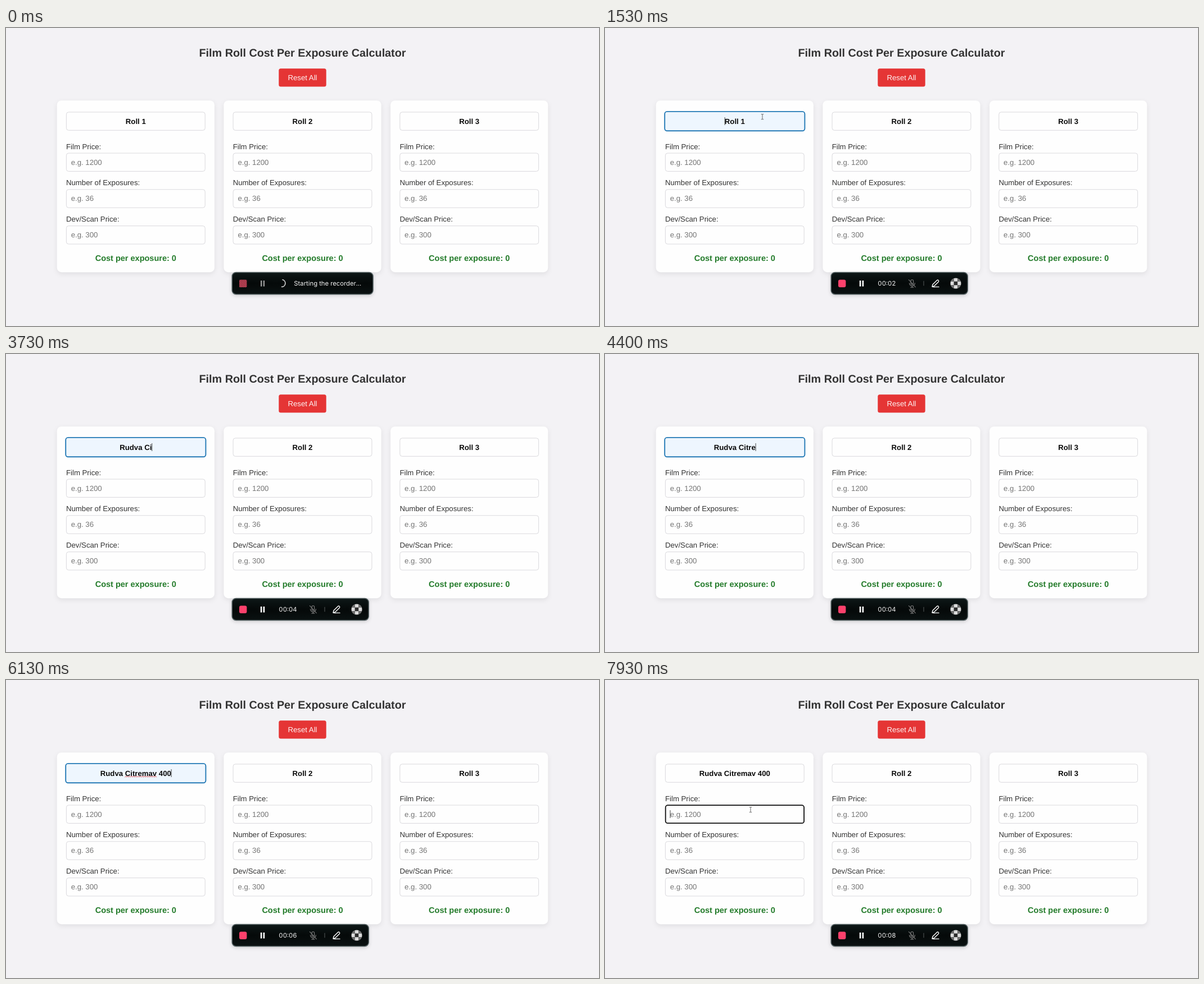
These frames come from a looping animation (1055x531 px, 8 s). An HTML page:

```html
<!DOCTYPE html>
<html lang="en">
<head>
<meta charset="utf-8">
<title>Film Roll Cost Per Exposure Calculator</title>
<style>
html, body { margin: 0; width: 100%; height: 100%; overflow: hidden; background: #f3f2f5; }
svg { display: block; width: 100vw; height: 100vh; }
text { font: 13.19px "Liberation Sans", Arial, sans-serif; fill: #333; white-space: pre; text-rendering: geometricPrecision; }
.mid { text-anchor: middle; }
.title { font-size: 19.78px; font-weight: bold; }
.name { font-weight: bold; fill: #0a0a0a; }
.hint { fill: #757575; }
.cost { font-size: 14.5px; font-weight: bold; fill: #237b2a; }
.card { fill: #fefefe; filter: drop-shadow(0 3px 4px rgba(0, 0, 0, .08)); }
.field { fill: #fefefe; stroke: #d6d5da; stroke-width: .9; }
.bar { fill: url(#ink); stroke: #536062; stroke-width: 1.5; filter: drop-shadow(0 2px 3px rgba(0, 0, 0, .15)); }
.bar-text { font: 11.3px Inter, Roboto, sans-serif; font-variant-numeric: tabular-nums; fill: #f4f4f4; }
.line { fill: none; stroke-linecap: round; stroke-linejoin: round; }
</style>
</head>
<body>
<svg viewBox="0 0 1055 531">
  <defs>
    <linearGradient id="ink" x2="0" y2="1"><stop stop-color="#0d1717"/><stop offset=".5" stop-color="#050909"/><stop offset="1" stop-color="#0a1111"/></linearGradient>
    <pattern id="hatch" width="3" height="3" patternUnits="userSpaceOnUse"><rect width="3" height="3" fill="#8d2f3e"/><path d="M0 0L3 3" stroke="#e2566c"/></pattern>
    <clipPath id="round"><circle cx="624" cy="455" r="9.8"/></clipPath>
  </defs>
  <text class="mid title" x="527.5" y="51">Film Roll Cost Per Exposure Calculator</text>
  <rect x="485.3" y="72.3" width="84.4" height="32.2" rx="3.5" fill="#e53535"/>
  <text class="mid" x="527.5" y="93" style="fill:#fdf4f4">Reset All</text>
  <g id="cards"></g>

  <rect id="nameFocus" x="106.2" y="148.9" width="249.2" height="34.4" rx="4.3" fill="#eef6fe" stroke="#2379b5" stroke-width="1.9"/>
  <rect id="priceFocus" class="line" x="107.7" y="223.2" width="246.4" height="32" rx="4" stroke="#111" stroke-width="1.8"/>
  <text id="name" class="mid name" x="230.8" y="170.6"></text>
  <path id="squiggle" class="line" stroke="#e0393c" stroke-width=".9"/>
  <path id="caret" d="M0 0v14" stroke="#333" stroke-width=".9"/>
  <path id="beam" class="line" d="M-1.8-4.6h1.2l.6.6.6-.6h1.2M0-4v8M-1.8 4.6h1.2l.6-.6.6.6h1.2" stroke="#555" stroke-width=".9"/>
  <path id="hand" class="line" d="M-3.8-.6C-5-1.8-3.6-3-2.6-2.2-3-4.4-1-4.8-.6-3.6-.2-5 1.6-4.8 1.7-3.5 2.6-4.4 4-3.4 3.9-2.2 5-2.2 5 0 4.5 1.4L3.2 4.6H-1.6C-2.4 2.8-4.4 1.6-3.8-.6ZM-.6-3.4v1.4M1.6-3.3v1.4M3.7-2.2v1.2" style="fill:#fff" stroke="#333" stroke-width="1"/>

  <g id="starting">
    <rect class="bar" x="402.2" y="435.4" width="250.8" height="39" rx="7"/>
    <rect x="415" y="448.5" width="13.4" height="13.4" rx="1.5" fill="url(#hatch)"/>
    <path d="M454.2 450v10.4M458.9 450v10.4" stroke="#999" stroke-width="2.4"/>
    <path id="spinner" class="line" d="M0-6.5A6.5 6.5 0 0 1-1.5 6.3" stroke="#ddd" stroke-width="1.6"/>
    <text class="bar-text" x="512.3" y="459.2">Starting the recorder...</text>
  </g>
  <g id="recording">
    <rect class="bar" x="402.2" y="435.4" width="243" height="39" rx="7"/>
    <rect x="415" y="448.5" width="13.4" height="13.4" rx="3" fill="#fd416c"/>
    <path d="M454.1 450v10.4M458.9 450v10.4" stroke="#fff" stroke-width="2.6"/>
    <text id="clock" class="mid bar-text" x="501.5" y="459.2"></text>
    <g class="line" stroke="#777" stroke-width="1.2">
      <rect x="544" y="448.5" width="4.6" height="8.4" rx="2.3"/>
      <path d="M541.5 454.5a4.9 4.9 0 0 0 9.8 0M546.4 459.5v2.6M543.8 462.1h5.2M540.4 448.6l12 13"/>
    </g>
    <path d="M567 450.8v8.4" stroke="#4a5050" stroke-width="1.2"/>
    <path class="line" d="M582 461l1-4 7.6-7.6q1.6-1 2.6.2t.1 2.6l-7.4 7.4-3.9 1.4q2.4.6 5 .4h7" stroke="#fff" stroke-width="1.4"/>
    <g id="checker" clip-path="url(#round)"></g>
  </g>
</svg>
<script>
const LOOP = 8000, CENTER = 230.8;
const el = id => document.getElementById(id);
const nameText = el('name'), caret = el('caret'), squiggle = el('squiggle');

const field = (x, y) => `<rect class="field" x="${x}" y="${y}" width="246.8" height="32.4" rx="4"/>`;
const rows = [['Film Price:', 1200], ['Number of Exposures:', 36], ['Dev/Scan Price:', 300]];
el('cards').innerHTML = [1, 2, 3].map(n => {
  const left = 90.7 + (n - 1) * 296.7, x = left + 16.7, mid = left + 140.1;
  return `<rect class="card" x="${left}" y="129.2" width="280.2" height="306" rx="8"/>` + field(x, 149.9) +
    (n > 1 ? `<text class="mid name" x="${mid}" y="170.6">Roll ${n}</text>` : '') +
    rows.map(([label, value], i) => {
      const y = 223 + i * 64.8;
      return `<text x="${x - .4}" y="${y - 7.4}">${label}</text>${field(x, y)}
        <text class="hint" x="${x + 8.3}" y="${y + 20.6}">e.g. ${value}</text>`;
    }).join('') +
    `<text class="mid cost" x="${mid}" y="415">Cost per exposure: 0</text>`;
}).join('');

const tones = ['#707070', '#dcdcdc', '#2b2b2b'];
for (let i = 0; i < 9; i++) {
  const col = i % 3, row = (i - col) / 3, tone = i === 4 ? 2 : i % 2;
  el('checker').innerHTML += `<rect x="${614.4 + col * 6.4}" y="${445.4 + row * 6.4}" width="6.4" height="6.4" fill="${tones[tone]}"/>`;
}

const TYPED = 'Rudva Citremav 400';
const keyTimes = [2130, 2400, 2740, 2900, 3080, 3300, 3560, 3700, 3950, 4080, 4220, 4420, 4560, 4720, 4980, 5400, 5650, 5800];
const RECORD = 140, FOCUS = 300, MOVE = 6960, CLICK = 7680;

// Pointer waypoints: time, x, y
const pointerPath = [[300, 280, 158], [1500, 280, 158], [1800, 280, 163], [6960, 280, 163],
  [7180, 282, 199], [7300, 282, 199], [7560, 259, 231], [8000, 259, 231]];
function pointerAt(t) {
  const i = Math.max(1, pointerPath.findIndex(p => p[0] > t));
  const [a, b] = [pointerPath[i - 1], pointerPath[i]];
  const k = Math.min(1, Math.max(0, (t - a[0]) / (b[0] - a[0])));
  const s = k * k * (3 - 2 * k);
  return [a[1] + (b[1] - a[1]) * s, a[2] + (b[2] - a[2]) * s];
}

const show = (node, on) => node.style.display = on ? '' : 'none';
const place = (node, x, y) => node.setAttribute('transform', `translate(${x} ${y})`);

function draw(t) {
  const count = keyTimes.filter(k => k <= t).length;
  const naming = t >= FOCUS && t < CLICK, pricing = t >= CLICK;
  show(el('nameFocus'), naming);
  show(el('priceFocus'), pricing);
  nameText.textContent = count ? TYPED.slice(0, count) : 'Roll 1';

  const half = nameText.getComputedTextLength() / 2;
  const lastAction = pricing ? CLICK : count ? keyTimes[count - 1] : FOCUS;
  show(caret, t >= FOCUS && (t - lastAction) % 1000 < 500);
  if (pricing) place(caret, 116, 232);
  else place(caret, CENTER + (count ? half : -half) + .3, 159);

  const misspelt = naming && count >= 15;
  show(squiggle, misspelt);
  if (misspelt) {
    const start = CENTER - half + nameText.getSubStringLength(0, 6);
    const waves = Math.round(nameText.getSubStringLength(6, 8) / 3.3);
    squiggle.setAttribute('d', `M${start} 173` + 'l1.65-1.6l1.65 1.6'.repeat(waves));
  }

  const [x, y] = pointerAt(t);
  const visible = t >= FOCUS && (t < 2600 || t >= MOVE);
  const overField = y < 183 || y > 222;
  show(el('beam'), visible && overField);
  show(el('hand'), visible && !overField);
  place(el('beam'), x, y);
  place(el('hand'), x, y);

  show(el('starting'), t < RECORD);
  show(el('recording'), t >= RECORD);
  el('spinner').setAttribute('transform', `translate(492 455) rotate(${t * .36})`);
  el('clock').textContent = '00:0' + Math.max(1, Math.floor((t + 500) / 1000));
}

function tick() {
  draw(performance.now() % LOOP);
  requestAnimationFrame(tick);
}
tick();
</script>
</body>
</html>
```
